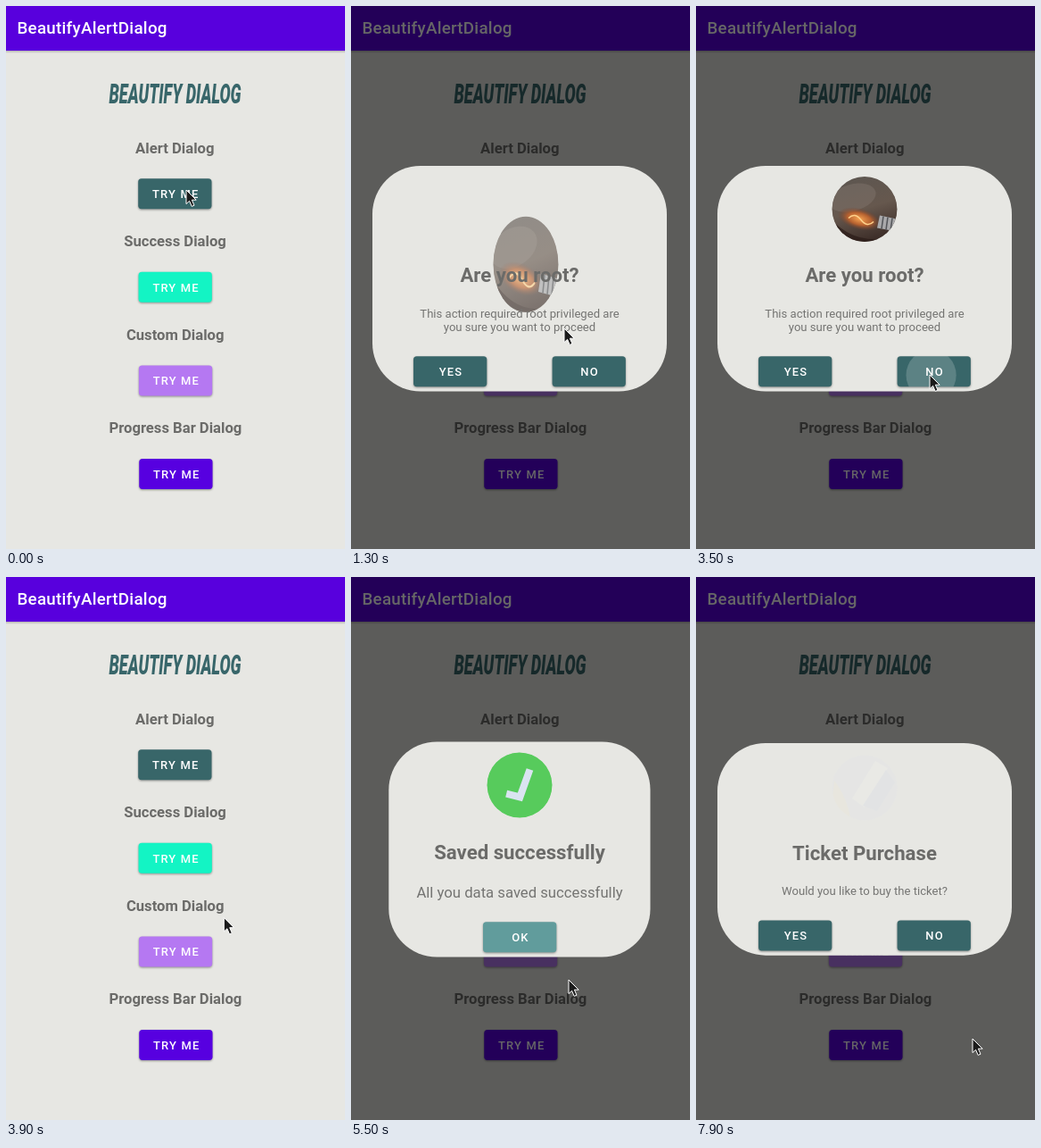
Animation of 380 by 608 pixels, one loop 8 s. Source, as an HTML page:

```html
<!DOCTYPE html>
<html lang="en">
<head>
<meta charset="utf-8">
<title>BeautifyAlertDialog</title>
<style>
  html, body { margin: 0; width: 100%; height: 100%; overflow: hidden; background: #e7e7e3; }
  svg { display: block; }
  text { font-family: Roboto, sans-serif; text-anchor: middle; fill: #6b6b69; }
  .bar { font-size: 18.8px; font-weight: 500; letter-spacing: .25px; text-anchor: start; fill: #fff; }
  .logo { font-size: 31px; font-weight: 900; font-style: italic; fill: #38666a; }
  .label { font-size: 16.65px; font-weight: 700; }
  .title { font-size: 22.2px; font-weight: 700; }
  .body { font-size: 13.1px; fill: #747472; }
  .big { font-size: 16.7px; }
  .cap { font-size: 12.95px; font-weight: 500; letter-spacing: 1.16px; fill: #fff; }
  .btn { filter: drop-shadow(0 1px 1px rgba(0, 0, 0, .38)); }
</style>
</head>
<body>
<svg id="stage" width="380" height="608" viewBox="0 0 380 608"></svg>
<script>
const LOOP = 8000;
const stage = document.getElementById('stage');

const text = (cls, x, y, s) => `<text class="${cls}" x="${x}" y="${y}">${s}</text>`;

const button = (x, y, fill, label, id = '') => `
  <rect class="btn" x="${x}" y="${y}" width="82.3" height="34" rx="3.7" fill="${fill}"/>
  <svg x="${x}" y="${y}" width="82.3" height="34">
    ${id && `<circle id="${id}" fill="#fff" opacity="0"/>`}
  </svg>
  ${text('cap', x + 42, y + 22, label)}`;

const dialog = (id, x, y, w, h, icon, content) => `
  <g id="${id}" opacity="0">
    <rect x="${x}" y="${y}" width="${w}" height="${h}" rx="54" fill="#e7e7e3"/>
    <g id="${id}Icon"><g clip-path="url(#round)">${icon}</g></g>
    ${content}
  </g>`;

const bulb = `
  <circle r="37" fill="url(#photo)"/>
  <ellipse cx="-10" cy="-16" rx="27" ry="15" fill="#81776d" opacity=".45" transform="rotate(-15)"/>
  <path d="M-37 12Q-12 38 22 33L10 40H-37Z" fill="#2b1d19" opacity=".75"/>
  <ellipse cx="-3" cy="12" rx="25" ry="12" fill="url(#glow)" transform="rotate(14)"/>
  <path d="M-18 10q7-7 14 2t14 2" fill="none" stroke="#ffd08a" stroke-width="1.6"/>
  <path d="M17 7L36 11V25L14 21Z" fill="#a9a9ab"/>
  <path d="M21 8l-2 14M26 9l-2 14M31 10l-2 14" stroke="#54565a" stroke-width="1.6"/>`;

const check = `
  <circle r="37" fill="#44c84b"/>
  <path d="M-17.5 3L-5 12.5 17.5-11.5" fill="none" stroke="#d9e4f3" stroke-width="8"/>`;

const ticket = `
  <circle r="37" fill="#d5dcf1"/>
  <path d="M-34-8Q-20 10-16 34L-38 30Z" fill="#f3e6b4"/>
  <path d="M-14 12L12-30 26-22 0 22Z" fill="#fff"/>
  <path d="M-2 20L24-20 34-6 14 26Z" fill="#b9c8f2"/>`;

const rows = [
  ['Alert Dialog', '#386669', 'tapAlert'],
  ['Success Dialog', '#13f4c4', 'tapSuccess'],
  ['Custom Dialog', '#b578f2', 'tapCustom'],
  ['Progress Bar Dialog', '#5700e0', '']
];

stage.innerHTML = `
  <defs>
    <clipPath id="round"><circle r="36.5"/></clipPath>
    <linearGradient id="photo" x1=".3" y1="0" x2=".6" y2="1">
      <stop offset="0" stop-color="#5d5650"/>
      <stop offset=".5" stop-color="#66584e"/>
      <stop offset="1" stop-color="#3a2b26"/>
    </linearGradient>
    <radialGradient id="glow">
      <stop offset="0" stop-color="#f4a050"/>
      <stop offset=".55" stop-color="#b4602f"/>
      <stop offset="1" stop-color="#6e4130" stop-opacity="0"/>
    </radialGradient>
    <linearGradient id="edge" x2="0" y2="1">
      <stop offset="0" stop-opacity=".22"/>
      <stop offset="1" stop-opacity="0"/>
    </linearGradient>
  </defs>
  <rect width="380" height="608" fill="#e7e7e3"/>
  <rect y="50" width="380" height="3" fill="url(#edge)"/>
  <rect width="380" height="50" fill="#5800dd"/>
  ${text('bar', 12.5, 31.3, 'BeautifyAlertDialog')}
  <g transform="translate(189.5 109) scale(.585 1)">${text('logo', 0, 0, 'BEAUTIFY DIALOG')}</g>
  ${rows.map(([name, fill, id], i) =>
    text('label', 189.3 + i * .2, 164.5 + i * 104.6, name) +
    button(148.2 + i * .35, 193.2 + i * 104.6, fill, 'TRY ME', id)).join('')}
  <rect id="dim" width="380" height="608" opacity="0"/>
  ${dialog('alert', 24, 179, 330, 252.5, bulb,
    text('title', 189, 309, 'Are you root?') +
    text('body', 189, 349, 'This action required root privileged are') +
    text('body', 189, 364.3, 'you sure you want to proceed') +
    button(70, 392.2, '#386669', 'YES') +
    button(225.6, 392.2, '#386669', 'NO', 'tapNo'))}
  ${dialog('success', 42.3, 184.5, 293.2, 241, check,
    text('title', 189, 315.8, 'Saved successfully') +
    text('body big', 189, 358.5, 'All you data saved successfully') +
    button(148, 386.2, '#619c9c', 'OK', 'tapOk'))}
  ${dialog('custom', 24, 186, 330, 237.7, ticket,
    text('title', 189, 317.3, 'Ticket Purchase') +
    text('body', 189, 356.3, 'Would you like to buy the ticket?') +
    button(70, 384.4, '#386669', 'YES') +
    button(225.6, 384.4, '#386669', 'NO'))}
  <path id="cursor" d="M0 0V15.6L3.6 12.3 6.2 18.4 9 17.2 6.4 11.2H11.2Z"
    fill="#1b1b1b" stroke="#fff" stroke-width="1"/>`;

const el = Object.fromEntries([...stage.querySelectorAll('[id]')].map(n => [n.id, n]));
const set = (node, attrs) => { for (const k in attrs) node.setAttribute(k, attrs[k]); };

const ramp = (t, a, b) => Math.min(1, Math.max(0, (t - a) / (b - a)));
const smooth = p => .5 - Math.cos(p * Math.PI) / 2;
const linear = p => p;

// Each key is [time, ...values].
function track(keys, t, ease) {
  let i = 0;
  while (i < keys.length - 2 && t >= keys[i + 1][0]) i++;
  const [a, b] = [keys[i], keys[i + 1]];
  const p = ease(ramp(t, a[0], b[0]));
  return a.slice(1).map((v, k) => v + (b[k + 1] - v) * p);
}

const pointer = [
  [0, 202, 206], [800, 202, 206], [1300, 239, 361], [1700, 262, 500], [2200, 258, 453],
  [2900, 262, 416], [3100, 262, 413], [3700, 262, 413], [4250, 202, 306], [4950, 202, 306],
  [5400, 244, 451], [5500, 244, 451], [5850, 191, 404], [6300, 191, 404], [6750, 207, 406],
  [7500, 207, 406], [7880, 310, 517]
];

// time, dx, dy, vertical scale, opacity
const bounce = [
  [850, 14, 150, 2.3, 0], [1300, 7, 62, 1.47, .62], [1600, 0, -11, .92, 1],
  [1900, 0, 5, .97, 1], [2200, 0, -2, .99, 1], [2450, 0, 0, 1, 1]
];

// name, open time, close time
const windows = [['alert', 570, 3650], ['success', 4695, 6250], ['custom', 7570, 9000]];

// id, start, x and y inside the button
const taps = [
  ['tapAlert', 400, 54, 13], ['tapNo', 3400, 38, 21], ['tapSuccess', 4500, 54, 8],
  ['tapOk', 6080, 43, 18], ['tapCustom', 7480, 58, 4]
];

function draw(t) {
  let shade = 0;
  for (const [name, open, close] of windows) {
    const rise = ramp(t, open, open + 270);
    const gone = ramp(t, close, close + 220);
    set(el[name], { opacity: (1 - (1 - rise) ** 2) * (1 - gone) });
    shade = Math.max(shade, rise * (1 - gone));
  }
  set(el.dim, { opacity: shade * .6 });

  for (const [id, start, cx, cy] of taps) {
    const age = t - start;
    const fade = age < 0 ? 0 : ramp(age, 0, 60) * (1 - ramp(age, 200, 420));
    set(el[id], { cx, cy, r: Math.max(0, Math.min(75, 18 + age * .1)), opacity: fade * .18 });
  }

  const [dx, dy, sy, alpha] = t < 850 ? [0, 0, 1, 1] : track(bounce, t, linear);
  set(el.alertIcon, { transform: `translate(${189 + dx} ${227.5 + dy}) scale(1 ${sy})`, opacity: alpha });

  const spin = t < 4980 ? 1 : smooth(ramp(t, 4980, 5650));
  set(el.successIcon, { transform: `translate(189 233) rotate(${200 * (spin - 1)})`, opacity: spin });

  set(el.customIcon, { transform: 'translate(189 236)', opacity: t < 7850 ? 1 : ramp(t, 7850, 8350) });

  set(el.cursor, { transform: `translate(${track(pointer, t, smooth)})` });
}

const begin = performance.now();
function tick() {
  draw((performance.now() - begin) % LOOP);
  requestAnimationFrame(tick);
}
tick();
</script>
</body>
</html>
```
